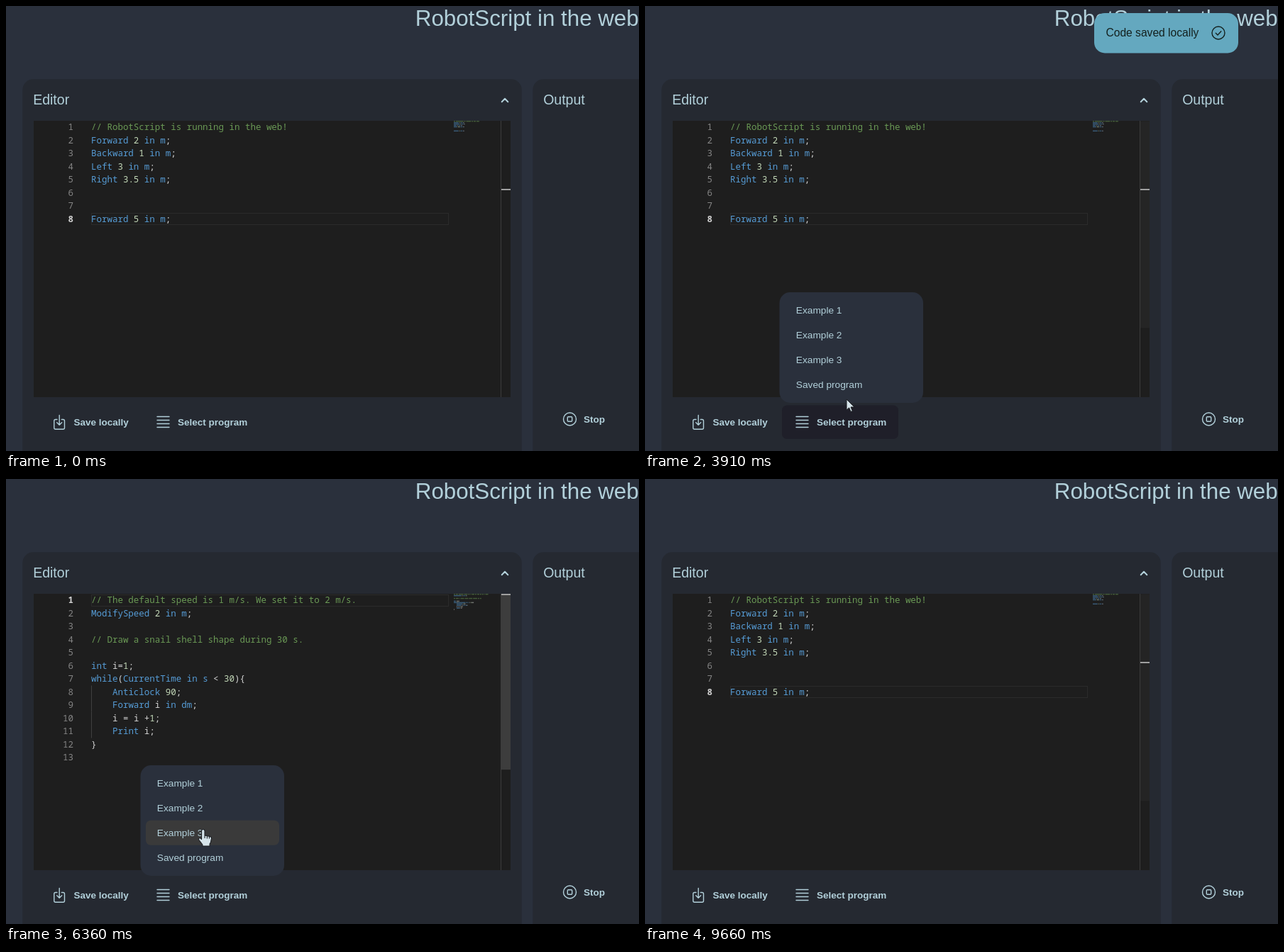
An HTML page for the animation above (9880 ms loop, 892 by 628 pixels).

```html
<!DOCTYPE html>
<html lang="en">
<head>
<meta charset="utf-8">
<title>RobotScript in the web</title>
<style>
  html, body { margin: 0; width: 100%; height: 100%; overflow: hidden; background: #2a303c; }
  svg { display: block; width: 892px; height: 628px; }
  text { font-family: "Liberation Sans", Arial, sans-serif; fill: #b2d0da; white-space: pre; }
  .bold { font-weight: bold; font-size: 13.5px; }
  .item { font-size: 13.7px; }
  .head { font-size: 19.5px; }
  .title { font-size: 31.3px; }
  .code text { font-family: "Noto Sans Mono", "DejaVu Sans Mono", monospace; font-size: 12.48px; fill: #d4d4d4; }
  .code .num { fill: #858585; text-anchor: end; }
  .code .on { fill: #d0d0d0; font-weight: 600; }
  .icon { fill: none; stroke: #b2d0da; stroke-width: 1.4; stroke-linecap: round; stroke-linejoin: round; }
  .cursor { fill: #d6e4ea; stroke: #1a1c20; stroke-width: 1; stroke-linejoin: round; }
</style>
</head>
<body>
<svg viewBox="0 0 892 628" xmlns="http://www.w3.org/2000/svg">
  <defs><clipPath id="toastClip"><rect x="633" y="10" width="203" height="56.5" rx="15"/></clipPath></defs>
  <rect width="892" height="628" fill="#2a303c"/>
  <text class="title" x="576.8" y="28">RobotScript in the web</text>

  <rect x="23.3" y="103.3" width="703.5" height="560" rx="15" fill="#252931"/>
  <rect x="742.3" y="103.3" width="300" height="560" rx="15" fill="#252931"/>
  <text class="head" x="38.2" y="139.3">Editor</text>
  <text class="head" x="757.2" y="139.3">Output</text>
  <path class="icon" d="M698.7 135.2l4.3-4.4 4.3 4.4" style="stroke-width:2"/>

  <rect x="39" y="162" width="672" height="390" fill="#1e1e1e"/>
  <g id="code" class="code"></g>
  <rect id="slider" x="697" y="162.5" width="14" fill="#797979"/>
  <path d="M697.5 162V552" stroke="#3c3c3c"/>
  <rect id="mark" x="698" width="13" height="2" fill="#a0a0a0"/>
  <rect id="caret" x="231" y="292" width="2" height="18" fill="#aeafad"/>

  <rect id="saveBg" x="47" y="563.5" width="142" height="47.5" rx="7" fill="#1f1f29"/>
  <rect id="selectBg" x="193" y="563.5" width="164" height="47.5" rx="7" fill="#1f1f29"/>
  <path class="icon" d="M72 583.5h-2.2q-2 0-2 2v9.7q0 2 2 2h10.7q2 0 2-2v-9.7q0-2-2-2h-2.2M75.2 577.5v13.5M71.7 587.7l3.5 3.5 3.5-3.5"/>
  <text class="bold" x="95.5" y="592">Save locally</text>
  <path class="icon" d="M213 579.5h17M213 584.5h17M213 589.5h17M213 594.5h17"/>
  <text class="bold" x="242" y="592">Select program</text>
  <g class="icon"><circle cx="794.5" cy="583" r="9"/><rect x="791.3" y="579.8" width="6.4" height="6.4" rx="1"/></g>
  <text class="bold" x="814" y="588">Stop</text>

  <g id="menu">
    <rect x="189.5" y="404" width="202.5" height="156" rx="15" fill="#2a303c"/>
    <g id="items"></g>
  </g>

  <g id="toast">
    <rect id="toastBg" x="633" y="10" width="203" height="56.5" rx="15"/>
    <text x="649.5" y="43" style="font-size:15.6px;fill:#14211f">Code saved locally</text>
    <g class="icon" style="stroke:#14211f"><circle cx="808" cy="38" r="9"/><path d="M804.3 38.3l2.7 2.7 4.8-5.3"/></g>
  </g>
  <g clip-path="url(#toastClip)"><text id="ghost" class="title" x="576.8" y="28">RobotScript in the web</text></g>

  <circle id="press" r="12" fill="#c4b032" fill-opacity=".78"/>
  <g id="pointer" class="cursor">
    <path id="arrow" d="M0 0V15.2l3.6-3.3 2.4 5.6 2.4-1-2.4-5.5h4.9z"/>
    <path id="hand" transform="translate(.8 0) scale(1.12 1)" d="M-2 13V1.5a2 2 0 0 1 4 0V8l6.5 1.5q2 .6 2 2.6l-1 5.6-1.2 2.3v3H-.8v-2l-4.4-6.5q-1-2 .4-2.6 1.4-.3 2.8 1.6zM2 8v4M5 9v3.5M7.7 9.5v3"/>
    <path id="beam" d="M-3-8h2q1 0 1 1.5V6.5Q0 8-1 8h-2M3-8H1q-1 0-1 1.5V6.5Q0 8 1 8h2" fill="none" style="stroke:#d0d0b8"/>
  </g>
</svg>
<script>
const LOOP = 9880, TOP = 162, PITCH = 18.5, VIEW = 389;
const $ = id => document.getElementById(id);

const saved = `// RobotScript is running in the web!
Forward 2 in m;
Backward 1 in m;
Left 3 in m;
Right 3.5 in m;


Forward 5 in m;`;
const square = `// Draw a square with sides of 2 m.

int i=0;
while(i < 4){
    Forward 2 in m;
    Clock 90;
    i = i +1;
}

Print i;
`;
const stairs = `// The robot climbs some stairs.
ModifySpeed 1 in m;

int i=0;
int n=5;

while(i < n){
    Forward 3 in dm;
    Left 2 in dm;
    i = i +1;
}

// Go back to the start.
while(i > 0){
    Backward 3 in dm;
    Right 2 in dm;
    i = i -1;
}

Print i;`;
const snail = `// The default speed is 1 m/s. We set it to 2 m/s.
ModifySpeed 2 in m;

// Draw a snail shell shape during 30 s.

int i=1;
while(CurrentTime in s < 30){
    Anticlock 90;
    Forward i in dm;
    i = i +1;
    Print i;
}
`;

// Start time, program, active line
const views = [[0, saved, 8], [4620, square, 1], [5280, stairs, 1], [6180, snail, 1], [7150, saved, 1], [8220, saved, 8]];
const presses = [[2230, 2380], [3430, 3580], [4450, 4600], [5130, 5270], [6040, 6180], [6980, 7130], [8190, 8290]];
const blinks = [[90, 290], [8220, 8520], [8800, 9050], [9330, 9580]];
// Start and end of each menu item's highlight
const marked = [[4330, 4760], [4760, 5420], [5420, 6560], [6560, 9000]];
const path = [
  [480, 226, 632], [580, 205, 613], [890, 205, 613], [1250, 130, 573], [1600, 130, 573], [2100, 131, 570],
  [2700, 131, 570], [2920, 195, 546], [3200, 275, 582], [3450, 284, 580], [3720, 284, 580], [3910, 284, 555],
  [4350, 281, 438], [4620, 281, 438], [4850, 280, 472], [5300, 280, 472], [5590, 277, 495],
  [6380, 277, 495], [6750, 286, 537], [7400, 286, 537], [7980, 297, 324], [8520, 297, 324],
  [8960, 284, 556], [9370, 275, 634]
];

const clamp = v => Math.max(0, Math.min(1, v));
const ramp = (t, a, b, c, d) => Math.min(clamp((t - a) / (b - a)), clamp((d - t) / (d - c)));
const within = (t, spans) => spans.some(([a, b]) => t >= a && t < b);
const set = (id, attrs) => { for (const k in attrs) $(id).setAttribute(k, attrs[k]); };
const show = (id, on) => $(id).setAttribute("opacity", +on);
const escape = s => s.replace(/&/g, "&amp;").replace(/</g, "&lt;");
const mix = (p, q, k) => `rgb(${p.map((v, i) => Math.round(v + (q[i] - v) * k))})`;

function tokens(line) {
  if (line.startsWith("//")) return [[line, "#6a9955", 0]];
  return [...line.matchAll(/[A-Za-z]+|[\d.]+|\s+|[^\w\s]+/g)].map(m => {
    const s = m[0];
    const color = /^([A-Z]\w*|int|while|in|m|dm|s)$/.test(s) ? "#569cd6" : /^\d/.test(s) ? "#c3d8b8" : "#d4d4d4";
    return [s, color, m.index];
  });
}

function drawCode(source, active) {
  const lines = source.split("\n");
  const frameY = Math.floor(TOP + PITCH * (active - 1) + 1) + .5;
  let out = `<rect x="120.5" y="${frameY}" width="503" height="16" fill="none" stroke="#2b2b2b"/>`;
  lines.forEach((line, i) => {
    const y = TOP + 13.4 + PITCH * i;
    out += `<text class="num${i + 1 === active ? " on" : ""}" x="95" y="${y}">${i + 1}</text>`;
    if (line.startsWith(" ")) out += `<rect x="120" y="${TOP + PITCH * i}" width="1" height="${PITCH}" fill="#404040"/>`;
    const parts = tokens(line);
    out += `<text x="120" y="${y}">` + parts.map(([s, c]) => `<tspan fill="${c}">${escape(s)}</tspan>`).join("") + "</text>";
    // Minimap
    for (const [s, c, col] of parts)
      for (const w of s.matchAll(/\S+/g))
        out += `<rect x="${631 + (col + w.index) * .97}" y="${TOP + 1.95 * i}" width="${w[0].length * .97}" height="1.4" fill="${c}" opacity=".5"/>`;
  });
  $("code").innerHTML = out;
  const scale = VIEW / (VIEW + (lines.length - 1) * PITCH);
  set("slider", { height: VIEW * scale });
  set("mark", { y: Math.max(TOP, Math.round(TOP - 1 + (active - 1) * PITCH * scale)) });
}

$("items").innerHTML = ["Example 1", "Example 2", "Example 3", "Saved program"].map((name, i) =>
  `<rect id="item${i}" x="197" y="${411.5 + 35.1 * i}" width="188" height="35" rx="7" fill="#3a3a3a"/>
   <text class="item" x="212.8" y="${434 + 35.1 * i}">${name}</text>`).join("");

function position(t) {
  const next = path.findIndex(p => p[0] > t);
  if (next === 0) return path[0].slice(1);
  if (next < 0) return path[path.length - 1].slice(1);
  const [a, x, y] = path[next - 1], [b, u, v] = path[next];
  const k = (t - a) / (b - a), e = k * k * (3 - 2 * k);
  return [x + (u - x) * e, y + (v - y) * e];
}

function cursorKind(x, y, menuOpen) {
  const inside = (l, t, r, b) => x >= l && x <= r && y >= t && y <= b;
  if (menuOpen && inside(190, 404, 392, 560)) return inside(197, 411, 385, 552) ? "hand" : "arrow";
  if (inside(47, 563, 189, 611) || inside(193, 563, 357, 611)) return "hand";
  return inside(39, 162, 711, 552) ? "beam" : "arrow";
}

let current = null;
function draw(t) {
  const view = views.filter(v => v[0] <= t).pop();
  if (view !== current) {
    current = view;
    drawCode(view[1], view[2]);
  }
  show("caret", within(t, blinks));
  show("slider", .34 * Math.max(ramp(t, 2850, 2950, 3300, 4080), ramp(t, 4620, 4680, 8950, 9850)));
  show("saveBg", ramp(t, 1130, 1230, 2740, 2880));
  show("selectBg", ramp(t, 3080, 3200, 3930, 4060));

  const menu = ramp(t, 3520, 3600, 8210, 8280);
  set("menu", { opacity: menu, visibility: menu ? "visible" : "hidden" });
  marked.forEach((span, i) => show("item" + i, within(t, [span])));

  const fade = ramp(t, 2300, 2690, 4310, 4700);
  show("toast", fade);
  set("toastBg", { fill: mix([88, 244, 97], [100, 168, 191], clamp(fade * 2 - 1)) });
  show("ghost", fade > 0 ? 1 - fade : 0);

  const [x, y] = position(t);
  const kind = cursorKind(x, y, menu > .5);
  for (const k of ["arrow", "hand", "beam"]) show(k, k === kind);
  set("pointer", { transform: `translate(${x.toFixed(1)} ${y.toFixed(1)})` });
  set("press", { cx: kind === "beam" ? x - 2.5 : x, cy: y - 1 });
  show("press", within(t, presses));
}

const start = performance.now();
function tick() {
  draw((performance.now() - start) % LOOP);
  requestAnimationFrame(tick);
}
tick();
</script>
</body>
</html>
```
